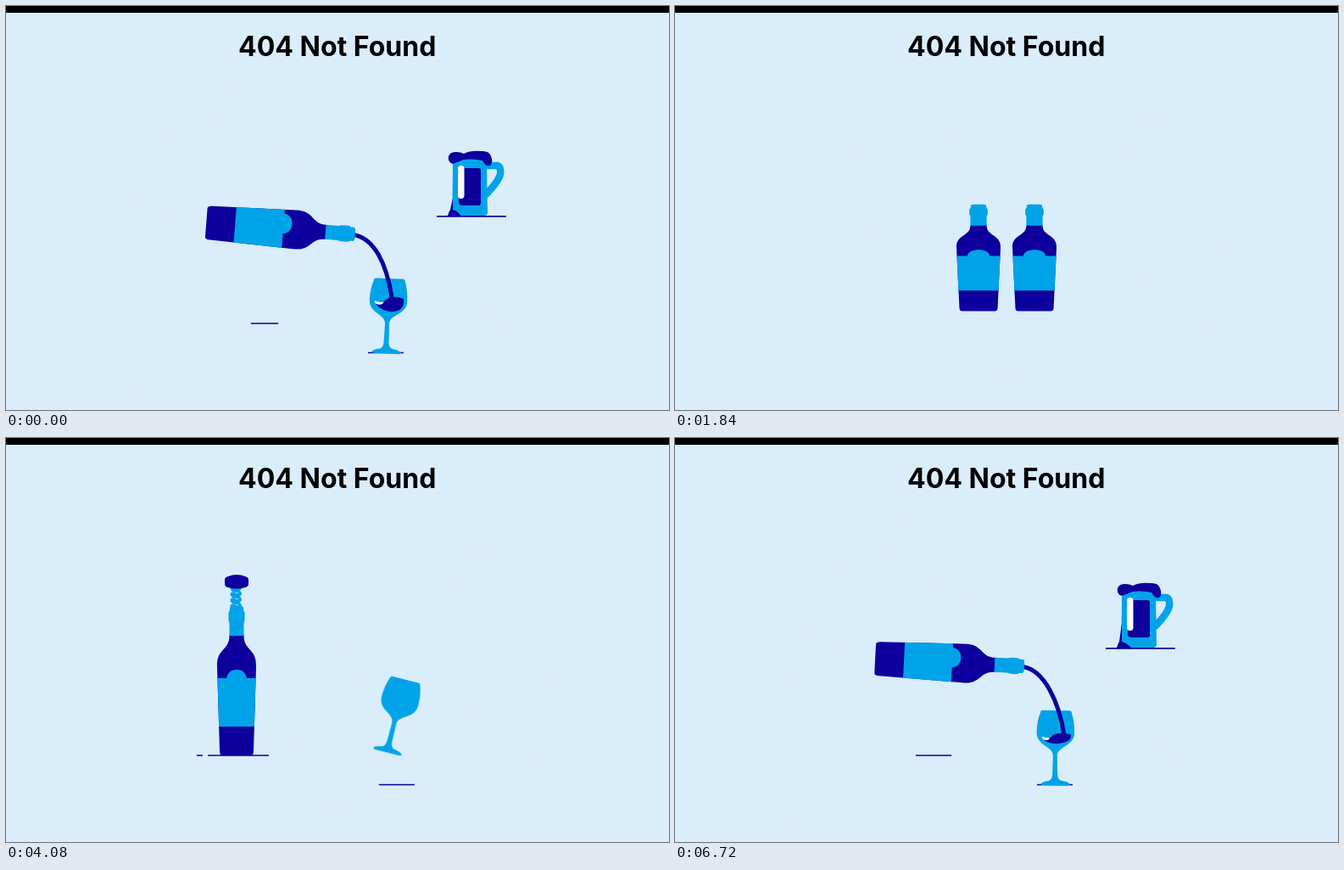
Recreate the animation shown at these times as an HTML page. Size 782 by 476 pixels, loop 6.8 s.

```html
<!DOCTYPE html>
<html lang="en">
<head>
<meta charset="utf-8">
<title>404 Not Found</title>
<style>
  html, body { margin: 0; width: 100%; height: 100%; overflow: hidden; background: #daedfb; }
  svg { display: block; width: 100%; height: 100%; }
  text { font: 700 32px Inter, "Open Sans", sans-serif; }
  .navy { fill: #0d009d; }
  .sky { fill: #00a3e8; }
  .line { stroke: #0d009d; fill: none; }
  .skyline { stroke: #00a3e8; fill: none; }
</style>
</head>
<body>
<svg viewBox="0 0 782 476">
  <defs>
    <clipPath id="view"><rect y="75" width="782" height="401"/></clipPath>
    <path id="body" d="M-17 0Q-20 0-20-6L-23-104C-24-127-8-123-8.5-142H8.5C8-123 24-127 23-104L20-6Q20 0 17 0Z"/>
    <clipPath id="bodyClip"><use href="#body"/></clipPath>
    <path id="cap" d="M-8.5-141V-156Q-10-159-9.5-164Q-10-169-8-171Q-9-176-5-176H5Q9-176 8-171Q10-169 9.5-164Q10-159 8.5-156V-141Z"/>
    <filter id="rough" filterUnits="userSpaceOnUse" x="0" y="0" width="782" height="476" color-interpolation-filters="sRGB">
      <feTurbulence id="noise" type="fractalNoise" baseFrequency=".22" numOctaves="1"/>
      <feDisplacementMap in="SourceGraphic" scale="1.5" xChannelSelector="R" yChannelSelector="G"/>
    </filter>
  </defs>
  <rect width="782" height="476" fill="#daedfb"/>
  <rect width="782" height="8"/>
  <text x="390.7" y="59" text-anchor="middle">404 Not Found</text>
  <g clip-path="url(#view)">
    <path id="specks" stroke="#fff" stroke-width="1.5" stroke-linecap="round" opacity=".5"/>
    <g filter="url(#rough)">
      <g id="table">
        <path id="lines" class="line" stroke-width="1.7"/>
        <g id="mug">
          <path class="skyline" stroke-width="8.5" d="M17-59H32Q37-58 36-49Q34-40 18-24"/>
          <path class="sky" d="M-17-66H17Q20-66 20-62L21-4Q21 0 17 0H-16Q-21 0-20.5-5L-20-62Q-20-66-17-66Z"/>
          <path id="beer" class="navy"/>
          <rect x="-14" y="-59" width="7.5" height="39" rx="3.7" fill="#fff"/>
          <path id="foam" class="navy" d="M-20-61C-28-63-27-76-16-75Q-11-75-7-73Q1-77 13-76Q23-77 25-70Q28-63 24-59Q19-57 15-65Q5-67-7-66Q-13-64-20-61Z"/>
          <path id="drip" class="navy"/>
        </g>
        <g id="glass">
          <path class="sky" d="M-17 0Q-15-3-8-4Q-3-5-3-12L-2.5-34C-3-45-22-45-22-61Q-22-74-18-84Q-18-87-15-87H16Q19-87 19-84Q22.5-74 22.5-61C22.5-45 3-45 2.5-34L3-12Q3-5 9-4Q16-3 18 0L16 1.5H-15Z"/>
          <path id="wine" class="navy"/>
          <path id="shine" fill="#fff"/>
        </g>
        <path id="stream" class="line"/>
      </g>
      <g id="screw">
        <path id="coil" class="skyline" stroke-width="3.5"/>
        <path id="cork" class="navy" d="M-7 11H7L4.500 48H-4.500Z"/>
        <path id="handle" class="navy"/>
      </g>
      <g id="bottles"></g>
      <g id="tops"></g>
    </g>
  </g>
</svg>
<script>
const $ = id => document.getElementById(id);
const LOOP = 6800, STEP = 80, START = 3600;
const TIP = 6400, POUR = 6640, CLEAR = 7520, TOSS = 7400, LAND = 8320, TILT = 8480, LEAVE = 9840;

const mix = (a, b, p) => a + (b - a) * p;
const arc = p => Math.sin(Math.PI * p);
const lin = (s, from, to) => Math.min(1, Math.max(0, (s - from) / (to - from)));
const ramp = (s, from, to) => { const p = lin(s, from, to); return p * p * (3 - 2 * p); };
const path = (id, d) => $(id).setAttribute("d", d);
const move = (el, value) => el.setAttribute("transform", value);
const show = (el, on) => el.setAttribute("display", on ? "inline" : "none");

// Height above the floor while falling in, landing at the given time.
const dropIn = (s, land) => 350 * (1 - lin(s, land - 160, land)) ** 2;

// Falls in, then makes one tilted hop.
function hop(s, land, height, tilt) {
  const p = lin(s, land, land + 320);
  return { p, up: dropIn(s, land) + height * 4 * p * (1 - p), angle: tilt * arc(p) };
}

function random(seed) {
  return () => {
    seed = (seed * 16807 + 11) % 2147483647;
    return seed / 2147483647;
  };
}

$("bottles").innerHTML = `<g><use href="#body" class="navy"/>
  <g clip-path="url(#bodyClip)" class="sky">
    <path d="M-25-91H25V-34H-25Z"/>
    <path class="bump" d="M-12-90C-11-98-6-101 0-101S11-98 12-90Z"/>
  </g><use href="#cap" class="sky"/></g>`.repeat(2);
$("tops").innerHTML = `<g><ellipse class="navy" rx="35"/>
  <g class="ring"><ellipse class="sky" rx="11.8" ry="10.8"/><ellipse class="navy" rx="5.3" ry="5"/></g></g>`.repeat(2);
const bottles = [...$("bottles").children], tops = [...$("tops").children];

function placeBottle(el, x, y, angle, sx, sy, bump) {
  move(el, `translate(${x} ${y}) rotate(${angle}) translate(0 88) scale(${sx} ${sy})`);
  move(el.querySelector(".bump"), `translate(${bump} 0)`);
}

function drawBottles(s, scroll) {
  const tip = ramp(s, TIP, POUR), drift = lin(s, POUR, 7000), spin = lin(s, TOSS, LAND);
  const tilt = ramp(s, TILT, TILT + 480), rise = lin(s, 7920, LAND);
  const pourY = 286 - 19 * tip - 11 * drift;
  const x = 272 + 52 * tip + 34 * (1 - (1 - spin) ** 2);
  const y = mix(pourY, 287, spin) - 680 * spin * (1 - spin);
  const angle = mix(91.4 * tip + 7 * drift, 360, spin);
  const bump = 27 * arc(spin) - 6 * tip * (1 - spin);
  const stretch = 1 + .025 * ramp(s, 4960, 5200) * (1 - ramp(s, 5280, 5440));
  const lift = 60 * tilt, wide = 1 + tilt / 2, tall = 1 - 1.1 * tilt;
  placeBottle(bottles[0], x, y - dropIn(s, 3760) - lift, spin > 0 ? angle : angle % 360, wide, stretch * tall, bump);
  placeBottle(bottles[1], 424, 287 + 578 * (1 - rise) ** 2 - lift, 0, wide, tall, 0);
  show(bottles[0], tilt < .6);
  show(bottles[1], rise > 0 && tilt < .6);

  const open = ramp(s, TILT + 160, TILT + 480);
  tops.forEach((top, i) => {
    show(top, tilt >= .6);
    move(top, `translate(${358 + i * 66} ${286 + i + scroll})`);
    top.firstElementChild.setAttribute("ry", mix(18, 30.5, open) + 2 * ramp(s, LEAVE, LEAVE + 400));
    move(top.querySelector(".ring"), `translate(.5 ${mix(-14, 5, open)})`);
  });
}

function drawScrew(s) {
  const pulled = s > 4960;
  const y = 169 - 150 * (1 - lin(s, 3840, 4080)) ** 2 + 15 * ramp(s, 4080, 4720)
    - 38 * ramp(s, 4960, 5280) - 140 * lin(s, 5280, 5440) ** 2;
  const w = 14 + 8 * Math.abs(arc(4.5 * lin(s, 4080, 4800)));
  show($("screw"), s > 3840 && s < 5520);
  show($("cork"), pulled);
  move($("screw"), `translate(${pulled ? 273 : 272} ${y})`);
  let coil = "M2 4";
  for (let turn = 0; turn < (pulled ? 1 : 4); turn++) {
    const c = 6 + turn * 7;
    coil += `C7 ${c} 5 ${c + 5} -2 ${c + 2}S-5 ${c + 6} 0 ${c + 5}`;
  }
  path("coil", coil);
  path("handle", `M${-w} -2Q${-w} -5 ${4 - w} -6Q0 -10 ${w - 4} -6Q${w} -5 ${w} -2V3Q${w} 6 ${w - 4} 7Q0 10 ${4 - w} 7Q${-w} 6 ${-w} 3Z`);
}

function drawMug(s, { up, angle }) {
  show($("mug"), s > 5040);
  move($("mug"), `translate(547 ${247 - up}) rotate(${angle})`);
  const top = mix(-46, -56, ramp(s, 5520, 5840));
  path("beer", `M-11 ${top + 3}Q-11 ${top} -8 ${top}H10Q13 ${top} 13 ${top + 3}V-15Q13 -12 10 -12H-9Q-13 -12 -13 -16Z`);
  const foam = ramp(s, 5840, 6240);
  show($("foam"), foam > 0);
  move($("foam"), `translate(0 -63) scale(${foam}) translate(0 63)`);
  const slide = lin(s, TIP, 7000);
  show($("drip"), slide > 0 && slide < 1);
  path("drip", `M-20 ${mix(-62, 0, slide)}L-20 -7Q-15 -6 ${-20 + 11 * arc(slide)} 0H-26Q-25 -4 -23 -7Z`);
}

function drawGlass(s, { p, up, angle }) {
  const x = mix(461, 447, 1 - (1 - p) ** 6) + ramp(s, 6560, 6720);
  const sway = 3 * arc(lin(s, 6700, 7000));
  show($("glass"), s > 3840);
  move($("glass"), `translate(${x} ${408 - up}) rotate(${angle + sway})`);

  const wet = s > POUR, level = mix(-1, 3, lin(s, POUR, POUR + 320)), early = Math.min(level, 1);
  const left = -54 - 4 * level, right = -59 - 5 * level, crest = -62 - 6 * level;
  show($("wine"), wet);
  show($("shine"), wet);
  path("wine", `M-16 ${left}Q-8 ${left + 3} -3 ${left - 4}Q4 ${crest} 18 ${right}Q20 -52 10 -49Q-5 -45 -16 ${left}Z`);
  path("shine", `M-16 ${left - 2}Q-10 ${left} ${-7 + 2 * early} ${left - 1}Q-7 ${left + 4} -15 ${left + 1}Z`);

  const mouth = 410 - early, endX = 459 - 4 * early, endY = 350 - 7 * level;
  show($("stream"), wet && s < 7440);
  path("stream", `M${mouth} 269.5C${mouth + 26} 273 ${endX - 6} ${endY - 38} ${endX} ${endY}`);
  $("stream").setAttribute("stroke-width", mix(5, 1, ramp(s, 7200, 7440)));
}

function drawLines(s, glass, mug) {
  let d = "";
  const add = (x, half, y) => { if (half > 0) d += `M${x - half} ${y}h${half * 2}`; };
  if (s >= 3760) {
    add(mix(274, 305, ramp(s, 6480, 6720)), 36 * (1 - lin(s, 6480, 7060)), 374);
    if (s < 6480) add(228.5, 3.5, 374);
  }
  if (s >= 4000) add(mix(461, 448, glass.p ** 3), 21, 408.5);
  if (s >= 5200) add(mix(552, 549, mug.p ** 3), mix(30, 41, mug.p ** 3), 247.8);
  path("lines", d);
}

function drawSpecks(step, scroll) {
  const next = random(1000 + step % 4 * 7919);
  let d = "";
  for (let i = 0; i < 20; i++) d += `M${130 + 525 * next()} ${80 + 380 * next()}h.1`;
  path("specks", d);
  move($("specks"), `translate(0 ${scroll})`);
}

function draw(now) {
  const step = Math.floor((now % LOOP) / STEP), t = step * STEP;
  // The story begins with the bottle landing and runs past the loop point.
  const s = t < START ? t + LOOP : t;
  const glass = hop(s, 4000, 52, 20), mug = hop(s, 5200, 30, 13);
  const scroll = s < LEAVE ? 0 : -206 * ((s - LEAVE) / 400) ** 2;
  drawLines(s, glass, mug);
  drawGlass(s, glass);
  drawMug(s, mug);
  drawScrew(s);
  drawBottles(s, scroll);
  drawSpecks(step, scroll);
  move($("table"), `translate(0 ${420 * lin(s, CLEAR, CLEAR + 400) ** 2})`);
  show($("table"), s < CLEAR + 400);
  $("noise").setAttribute("seed", step % 6);
}

const begin = performance.now();
function frame() {
  draw(performance.now() - begin);
  requestAnimationFrame(frame);
}
frame();
</script>
</body>
</html>
```
